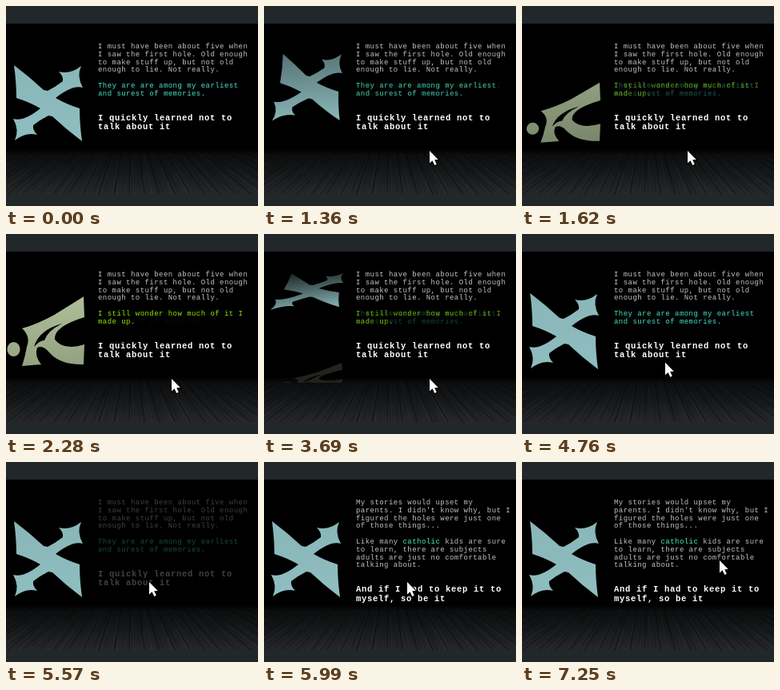
These frames come from a looping animation (315 px wide and 250 px high, 8 s). An HTML page with a canvas:

```html
<!DOCTYPE html>
<html lang="en">
<head>
<meta charset="utf-8">
<title>Memories</title>
<style>
html, body { margin: 0; width: 100%; height: 100%; overflow: hidden; background: #000; }
canvas { display: block; width: 315px; height: 250px; }
</style>
</head>
<body>
<canvas id="stage" width="315" height="250"></canvas>
<script>
const W = 315, H = 250, LOOP = 8000, TICK = 137, PHASE = 500 % TICK;
const ctx = document.getElementById('stage').getContext('2d');

const mix = (a, b, k) => a + (b - a) * k;
const ramp = (t, a, b) => Math.min(1, Math.max(0, (t - a) / (b - a)));
const tone = (rgb, k) => `rgb(${rgb.map(v => Math.round(Math.min(255, v * k)))})`;

// Exponential swing to the second side and back again.
const TURN = 1290, RETURN = 3537;
function swing(t, tau) {
  if (t < TURN) return 0;
  return t < RETURN ? 1 - Math.exp((TURN - t) / tau) : Math.exp((RETURN - t) / tau);
}

// Half of the cross; the rest is its point reflection.
const HALF = [[10, 74], [30, 89, 47, 105], [52, 106], [62, 101, 71, 94], [72, 88, 66, 82],
  [80, 86, 94, 75], [88, 88, 96, 102], [83, 98, 62, 115], [76, 123, 92, 128], [92, 147, 95, 169]];
const CROSS = HALF.concat(HALF.slice(1).map(p => p.map((v, i) => (i % 2 ? 243 : 105) - v)));
const LEAF = [
  [[97, 78], [60, 101], [40, 112, 20, 118], [31, 128, 26, 141], [24, 153, 20, 165], [44, 163],
    [35, 152, 39, 142], [46, 138, 54, 148], [68, 164, 97, 163], [98, 138], [72, 146, 61, 132],
    [59, 116, 98, 104], [97, 78]],
  [[35, 141], [41, 120, 70, 112], [52, 121, 48, 133], [42, 133, 35, 141]]
];

// Corners clockwise from top left: at rest, and part of the way round.
const CROSS_REST = [10, 75, 95, 75, 95, 168, 10, 168], CROSS_AWAY = [34, 50, 100, 49, 94, 91, 7, 95];
const LEAF_REST = [1, 78, 98, 78, 98, 166, 1, 166], LEAF_AWAY = [24, 172, 98, 161, 98, 191, 20, 193];

function warp([l, t, r, , , b], q) {
  return (x, y) => {
    const u = (x - l) / (r - l), v = (y - t) / (b - t);
    return [0, 1].map(n => mix(mix(q[n], q[2 + n], u), mix(q[6 + n], q[4 + n], u), v));
  };
}

function trace(points, map) {
  points.forEach((p, i) => {
    const a = map(p[0], p[1]);
    if (i === 0) ctx.moveTo(...a);
    else if (p.length === 2) ctx.lineTo(...a);
    else ctx.quadraticCurveTo(...a, ...map(p[2], p[3]));
  });
  ctx.closePath();
}

function shade(top, bottom, rgb, a, b) {
  const g = ctx.createLinearGradient(30, top, 36, bottom);
  g.addColorStop(0, tone(rgb, a));
  g.addColorStop(1, tone(rgb, b));
  return g;
}

function drawCross(p) {
  // The top edge leads the bottom edge through the roll.
  const k = p / .45, top = k ** .7, low = k ** 1.35;
  const q = CROSS_REST.map((v, i) => mix(v, CROSS_AWAY[i], i < 4 ? top : low));
  ctx.beginPath();
  trace(CROSS, warp(CROSS_REST, q));
  ctx.fillStyle = shade(q[1], q[7], [143, 190, 192], Math.max(.2, .96 - p * 1.75), 1 - p * .25);
  ctx.fill();
}

function drawLeaf(p) {
  const k = (p - .45) / .55, light = mix(.22, 1.05, Math.max(0, k));
  const q = LEAF_REST.map((v, i) => mix(LEAF_AWAY[i], v, k)), map = warp(LEAF_REST, q);
  ctx.save();
  ctx.beginPath();
  ctx.rect(0, 22, 110, 164);
  ctx.clip();
  ctx.fillStyle = shade(q[3], q[5], [167, 184, 147], light, light * .84);
  ctx.beginPath();
  LEAF.forEach(part => trace(part, map));
  ctx.fill('evenodd');
  ctx.beginPath();
  for (let a = 0; a < 6.28; a += Math.PI / 12) {
    ctx.lineTo(...map(9.5 + 8 * Math.cos(a), 144 + 9 * Math.sin(a)));
  }
  ctx.fill();
  ctx.restore();
}

function drawRoom() {
  ctx.fillStyle = '#000';
  ctx.fillRect(0, 0, W, H);
  const floor = ctx.createLinearGradient(0, 179, 0, 235);
  floor.addColorStop(0, '#000');
  floor.addColorStop(.12, '#0c0d0e');
  floor.addColorStop(.5, '#161718');
  floor.addColorStop(1, '#252728');
  ctx.fillStyle = floor;
  ctx.fillRect(0, 179, W, 56);

  // Planks fan out from a point above the floor.
  let seed = 7;
  const rnd = () => (seed = seed * 16807 % 2147483647) / 2147483647;
  const at = (x, y) => 157 + (x - 157) * (y - 110) / 125;
  for (let x = -150; x < 470; x += 19) {
    for (let n = 0; n < 5; n++) {
      const gx = n ? x + rnd() * 19 : x, y = n ? mix(183, 225, rnd()) : 183;
      ctx.strokeStyle = n % 2 ? 'rgba(255,255,255,.035)' : `rgba(0,0,0,${n ? .2 : .45})`;
      ctx.beginPath();
      ctx.moveTo(at(gx, y), y);
      ctx.lineTo(at(gx, 235), 235);
      ctx.stroke();
    }
  }
  ctx.fillStyle = '#22272a';
  ctx.fillRect(0, 0, W, 22);
  ctx.fillRect(0, 235, W, 15);
}

const LEFT = 115, CHAR = 5.85, GREY = '#c2c2c2', WHITE = '#fff';

function say(lines, y, color, alpha, big) {
  ctx.globalAlpha = alpha;
  ctx.fillStyle = color;
  ctx.font = (big ? 'bold 10.5px' : '9px') + ' "Liberation Mono", monospace';
  ctx.letterSpacing = big ? '.7px' : '.45px';
  lines.forEach((s, i) => ctx.fillText(s, LEFT, y + i * (big ? 11.5 : 9.8)));
  ctx.globalAlpha = 1;
}

function drawText(t) {
  const one = 1 - ramp(t, 5310, 5690), two = ramp(t, 5700, 5970);
  const k = swing(t, 330), hover = ramp(t, 5030, 5310);
  say(['I must have been about five when', 'I saw the first hole. Old enough',
    'to make stuff up, but not old', 'enough to lie. Not really.'], 53, GREY, one);
  say(['They are are among my earliest', 'and surest of memories.'], 102, '#48e4cc', one * (1 - k));
  say(['I still wonder how much of it I', 'made up.'], 102, '#9cf000', one * k);
  say(['I quickly learned not to', 'talk about it'], 142.5, tone([255, 255, 255], 1 - hover * .2), one, true);

  say(['My stories would upset my', "parents. I didn't know why, but I",
    'figured the holes were just one', 'of those things...'], 53, GREY, two);
  say(['Like many          kids are sure', 'to learn, there are subjects',
    'adults are just no comfortable', 'talking about.'], 102, GREY, two);
  say([' '.repeat(10) + 'catholic'], 102, '#48f0c0', two);
  say(['And if I had to keep it to', 'myself, so be it'], 162, WHITE, two, true);
}

// Pointer waypoints: time, x, y
const PATH = [[500, 202, 236], [1060, 207, 181], [3800, 207, 181], [4730, 179, 161],
  [5310, 179, 150], [6650, 179, 150], [7050, 247, 123]];
const ARROW = [[0, 0], [0, 15.5], [3.5, 12.2], [6.3, 18], [8.8, 16.8], [6.2, 11.2], [10.8, 11]];

function drawPointer(t) {
  if (t < PATH[0][0]) return;
  let [, x, y] = PATH[0];
  PATH.slice(1).forEach(([end, nx, ny], i) => {
    const k = ramp(t, PATH[i][0], end);
    x = mix(x, nx, k);
    y = mix(y, ny, k);
  });
  ctx.beginPath();
  ARROW.forEach(p => ctx.lineTo(x + p[0], y + p[1]));
  ctx.closePath();
  ctx.strokeStyle = '#000';
  ctx.lineWidth = 2;
  ctx.stroke();
  ctx.fillStyle = WHITE;
  ctx.fill();
  ctx.lineWidth = 1;
}

const start = performance.now();
function frame() {
  const now = (performance.now() - start) % LOOP;
  // The picture advances in even ticks.
  const t = Math.floor((now - PHASE) / TICK) * TICK + PHASE;
  const p = swing(t, 143);
  drawRoom();
  if (p < .6) drawCross(p);
  if (p > .3) drawLeaf(p);
  drawText(t);
  drawPointer(t);
  requestAnimationFrame(frame);
}
frame();
</script>
</body>
</html>
```
